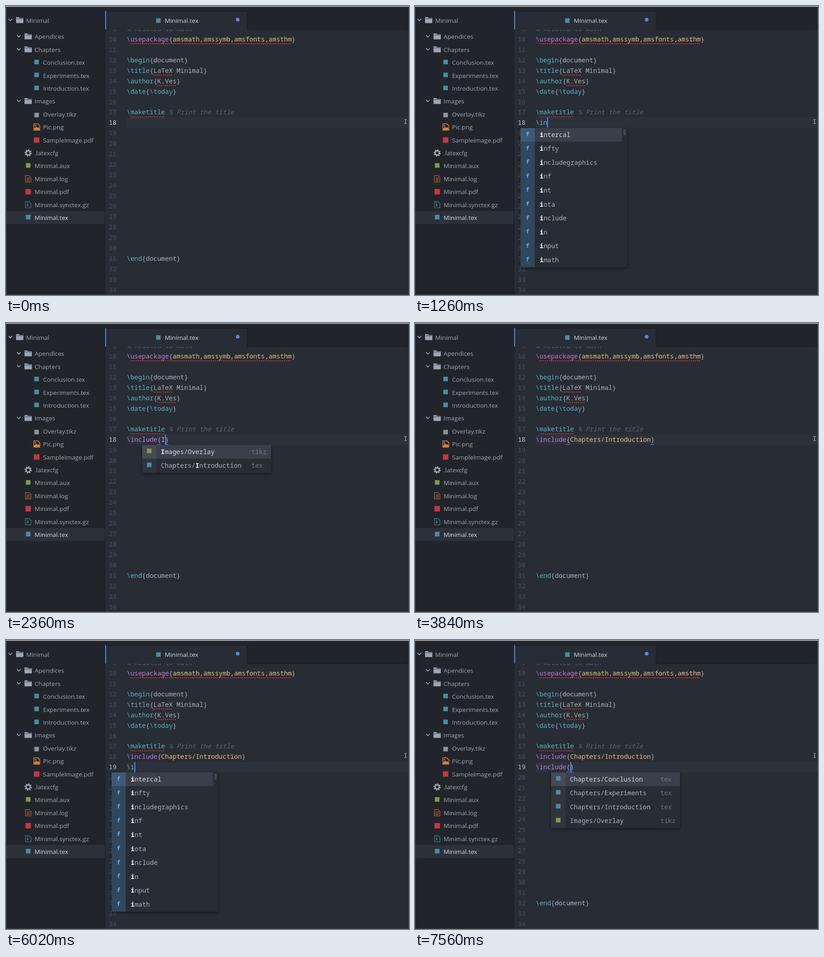
Animation, 882 px wide and 635 px high, one loop 8000 ms. Source, as an HTML page:

```html
<!DOCTYPE html>
<html lang="en">
<head>
<meta charset="utf-8">
<title>Editor</title>
<style>
html, body { margin: 0; width: 100%; height: 100%; overflow: hidden; background: #282c34; }
svg { display: block; width: 882px; height: 635px; }
text { white-space: pre; font: 14px "Noto Sans Mono", monospace; fill: #abb2bf; }
.ui { font: 13.5px "Open Sans", sans-serif; fill: #9da5b4; }
.lit { fill: #d7dae0; }
.b { font-weight: 700; fill: #fff; }
.cy { fill: #56b6c2; }
.pu { fill: #c678dd; }
.ye { fill: #e5c07b; }
.co { fill: #5c6370; font-style: italic; }
.no { fill: #495162; }
.on { fill: #c3c8d1; }
.dim { fill: #6f7785; }
.fn { fill: #61afef; font-weight: 700; font-size: 13px; }
.popup { filter: drop-shadow(0 2px 3px #0007); }
</style>
</head>
<body>
<svg viewBox="0 0 882 635">
  <g id="code"></g>
  <g id="frame"></g>
  <g id="menu"></g>
</svg>
<script>
const CW = 8.4, LH = 22.95, ROW = 30.6, LEFT = 264;
const BLUE = '#528bff', TEX = '#4c8ba3', GREEN = '#849b45', RED = '#c4373d', GREY = '#9da5b4';
const $ = id => document.getElementById(id);

const rect = (x, y, w, h, fill, r = 0) =>
  `<rect x="${x}" y="${y}" width="${w}" height="${h}" rx="${r}" fill="${fill}"/>`;
const text = (x, y, s, cls = '') => `<text x="${x}" y="${y}" class="${cls}">${s}</text>`;
const span = (cls, s) => `<tspan class="${cls}">${s}</tspan>`;
const line = (d, color, w = 1.2, extra = '') =>
  `<path d="${d}" fill="none" stroke="${color}" stroke-width="${w}" ${extra}/>`;
const badge = (cx, cy, color, s = 10) => rect(cx - s / 2, cy - s / 2, s, s, color);
const rowY = n => 245 + (n - 18) * LH;
const colX = c => LEFT + c * CW;

// ---- Sidebar and tab bar ----
const icons = {
  folder: (x, y) => `<path d="M${x - 8} ${y - 6}q0-1 1-1h5l2 2h7q1 0 1 1v9q0 1-1 1h-14q-1 0-1-1z" fill="${GREY}"/>`
    + line(`M${x - 7} ${y - 3.5}h14`, '#21252b', .8),
  tex: (x, y) => badge(x, y - 1, TEX),
  tikz: (x, y) => badge(x, y + 2, '#8892a0'),
  aux: (x, y) => badge(x, y - 1, GREEN),
  pdf: (x, y) => badge(x, y, RED, 12),
  png: (x, y) => line(`M${x - 6} ${y - 7}h9l4 4v10h-13z`, '#d9843b', 1.5)
    + `<path d="M${x - 5} ${y + 6}v-3l4-4 3 3 2-2 2 3v3z" fill="#d9843b"/><circle cx="${x - 2.5}" cy="${y - 3}" r="1.5" fill="#d9843b"/>`,
  log: (x, y) => line(`M${x - 6} ${y - 7}h8l4 4v10h-12zM${x - 3.5} ${y - 2}h7m-7 3h7m-7 3h7`, '#b9653a'),
  gz: (x, y) => line(`M${x - 6} ${y - 7}h8l4 4v10h-12zM${x - 2} ${y - 6}v2m2-1v2m-2 0v2m0 1h2v3h-2z`, '#3f8798'),
  gear: (x, y) => `<circle cx="${x}" cy="${y}" r="4.6" fill="none" stroke="${GREY}" stroke-width="3"/>`
    + `<circle cx="${x}" cy="${y}" r="6.7" fill="none" stroke="${GREY}" stroke-width="2.6" stroke-dasharray="2.6 2.662"/>`
};

// depth, icon, label
const files = [
  [1, 'folder', 'Apendices'], [1, 'folder', 'Chapters'],
  [2, 'tex', 'Conclusion.tex'], [2, 'tex', 'Experiments.tex'], [2, 'tex', 'Introduction.tex'],
  [1, 'folder', 'Images'],
  [2, 'tikz', 'Overlay.tikz'], [2, 'png', 'Pic.png'], [2, 'pdf', 'SampleImage.pdf'],
  [1, 'gear', '.latexcfg'], [1, 'aux', 'Minimal.aux'], [1, 'log', 'Minimal.log'],
  [1, 'pdf', 'Minimal.pdf'], [1, 'gz', 'Minimal.synctex.gz'], [1, 'tex', 'Minimal.tex']
];

function fileRow(depth, icon, label, y) {
  const x = 30 + depth * 18.5;
  return icons[icon](x, y)
    + (icon == 'folder' ? line(`M${x - 24.5} ${y - 3}l4 4 4-4`, GREY, 1.6) : '')
    + text(x + 14, y + 5, label, label == 'Minimal.tex' ? 'ui lit' : 'ui');
}

$('frame').innerHTML =
  rect(0, 0, 217, 635, '#21252b') + rect(217, 0, 665, 52, '#21252b')
  + rect(0, 450.5, 216, 28.5, '#2c313a')
  + rect(216, 11, 1, 624, '#181a1f') + rect(527, 51.5, 355, 1, '#181a1f')
  + rect(217, 11, 311, 41, '#181a1f') + rect(217, 12, 310, 40, '#282c34')
  + rect(217, 11, 2, 40.5, '#568af2')
  + badge(333.5, 32, TEX) + text(347.5, 37, 'Minimal.tex', 'ui lit')
  + '<circle cx="507" cy="30" r="4" fill="#568af2"/>'
  + fileRow(0, 'folder', 'Minimal', 31.5)
  + files.map((f, i) => fileRow(...f, 67.3 + i * 28.4)).join('')
  + rect(0, 0, 882, 1.7, '#b4b6b9') + rect(0, 2, 1, 633, '#44474d')
  + rect(881, 2, 1, 633, '#44474d') + rect(0, 634, 882, 1, '#44424a')
  + line('M872 249.5h2m1 0h2M874.5 250v8M872 258.5h2m1 0h2', '#d5d8dd', 1);

// ---- Document ----
const doc = {
  9: span('co', '% Related to math'),
  10: span('pu', '\\usepackage') + '{' + span('ye', 'amsmath,amssymb,amsfonts,amsthm') + '}',
  12: span('cy', '\\begin') + '{document}',
  13: span('cy', '\\title') + '{LaTeX Minimal}',
  14: span('cy', '\\author') + '{K.Ves}',
  15: span('cy', '\\date') + '{' + span('cy', '\\today') + '}',
  17: span('cy', '\\maketitle') + ' ' + span('co', '% Print the title')
};
const misspelt = [[10, 1, 43], [13, 7, 12], [14, 8, 13], [17, 1, 10]];

const command = s => {
  const m = s.match(/^(.*)\{(.*)\}$/);
  return m ? span('pu', m[1]) + '{' + span('ye', m[2]) + '}' : span('cy', s);
};
const intro = '\\include{Chapters/Introduction}';

function drawCode(row, typed, caret) {
  const lines = { ...doc, [row + 13]: span('cy', '\\end') + '{document}' };
  if (row == 19) lines[18] = command(intro);
  lines[row] = command(typed);
  let out = rect(LEFT, rowY(row), 618, LH, '#2c323c');
  for (let n = 9; n <= 34; n++) {
    const y = rowY(n) + 16.4;
    out += text(n < 10 ? 233.4 : 225, y, n, n == row ? 'on' : 'no') + text(LEFT, y, lines[n] || '');
  }
  for (const [n, a, b] of misspelt)
    out += line(`M${colX(a)} ${rowY(n) + 21.5}H${colX(b)}`, '#d63a36', 2, 'stroke-dasharray="2.2 2"');
  if (typed.endsWith('}'))
    for (const c of [typed.indexOf('{'), typed.length - 1])
      out += rect(colX(c), rowY(row) + 21.5, CW - .6, 1.2, BLUE);
  if (caret >= 0) out += rect(Math.round(colX(caret) + .2), rowY(row), 2, LH, BLUE);
  $('code').innerHTML = out;
}

// ---- Completion menus ----
const menus = {
  all: { mark: '', w: 276, bar: 1, items: 'alpha beta documentclass usepackage leftrightsquigarrow section subsection textbf emph label' },
  i: { mark: 'i', w: 233, bar: 1, items: 'intercal infty includegraphics inf int iota include in input imath' },
  inc: { mark: 'inc', w: 222, items: 'includegraphics include' },
  files: { mark: '', w: 282, items: 'Chapters/Conclusion Chapters/Experiments Chapters/Introduction Images/Overlay' },
  I: { mark: 'I', w: 282, items: 'Images/Overlay Chapters/Introduction' },
  In: { mark: 'In', w: 274, items: 'Chapters/Introduction' },
  Int: { mark: 'Int', w: 274, items: 'Chapters/Introduction' },
  Intr: { mark: 'Intr', w: 274, items: 'Chapters/Introduction' }
};

function drawMenu(row, name) {
  const m = menus[name];
  if (!m) return $('menu').innerHTML = '';
  const items = m.items.split(' '), paths = m.items.includes('/');
  const x = paths ? 298 : 231, y = rowY(row) + LH, h = items.length * ROW;
  let out = `<g class="popup">${rect(x, y, m.w, h, '#282c34', 2)}</g>`
    + rect(x, y, 31, h, paths ? '#30343d' : '#31475b')
    + rect(x + 31, y, m.w - 31 - (m.bar ? 11 : 0), 30, '#3a3f4b')
    + rect(x, y, 31, 30, paths ? '#454a55' : '#3f5a75');
  if (m.bar) out += rect(x + m.w - 8, y + 3, 5, 13, '#414650', 1);
  items.forEach((s, i) => {
    const cy = y + 14.6 + i * ROW, tikz = s.startsWith('Images');
    const label = m.mark ? s.replace(m.mark, span('b', m.mark)) : s;
    out += text(x + (paths ? 41 : 42), cy + 5, label, i ? '' : 'lit');
    out += paths
      ? badge(x + 15.5, cy - 1.5, tikz ? GREEN : TEX) + text(x + 239, cy + 5, tikz ? 'tikz' : 'tex', 'dim')
      : text(x + 11.5, cy + 3.5, 'f', 'fn');
  });
  $('menu').innerHTML = out;
}

// ---- Timeline: time, row, typed text, caret column (-1 hidden), menu ----
const inc = '\\include{}';
const steps = [
  [0, 18, '', -1], [270, 18, '\\', 1], [580, 18, '\\', 1, 'all'], [700, 18, '\\', -1, 'all'],
  [1110, 18, '\\i', 2, 'all'], [1260, 18, '\\in', 3, 'i'], [1410, 18, '\\inc', 4, 'inc'],
  [1690, 18, '\\incl', 5, 'inc'], [1810, 18, inc, 9], [1930, 18, inc, 9, 'files'],
  [2360, 18, '\\include{I}', 10, 'I'], [2640, 18, '\\include{In}', 11, 'In'],
  [3040, 18, '\\include{Int}', 12, 'Int'], [3160, 18, '\\include{Intr}', 13, 'Intr'],
  [3280, 18, intro, 30], [3840, 18, intro, -1], [4120, 18, intro, 30], [4390, 18, intro, 31],
  [4700, 19, '', 0], [5100, 19, '', -1], [5500, 19, '\\', 1], [5650, 19, '\\', 1, 'all'],
  [5900, 19, '\\i', 2, 'all'], [6020, 19, '\\i', 2, 'i'], [6140, 19, '\\in', 3, 'i'],
  [6570, 19, '\\in', -1, 'i'], [6720, 19, inc, 9], [6870, 19, inc, 9, 'files'],
  [7270, 19, inc, -1, 'files'], [7560, 19, inc, 9, 'files']
];

let shown;
function tick() {
  const t = performance.now() % 8000;
  const step = steps.findLast(s => s[0] <= t);
  if (step != shown) {
    const [, row, typed, caret, menu] = shown = step;
    drawCode(row, typed, caret);
    drawMenu(row, menu);
  }
  requestAnimationFrame(tick);
}
tick();
</script>
</body>
</html>
```
